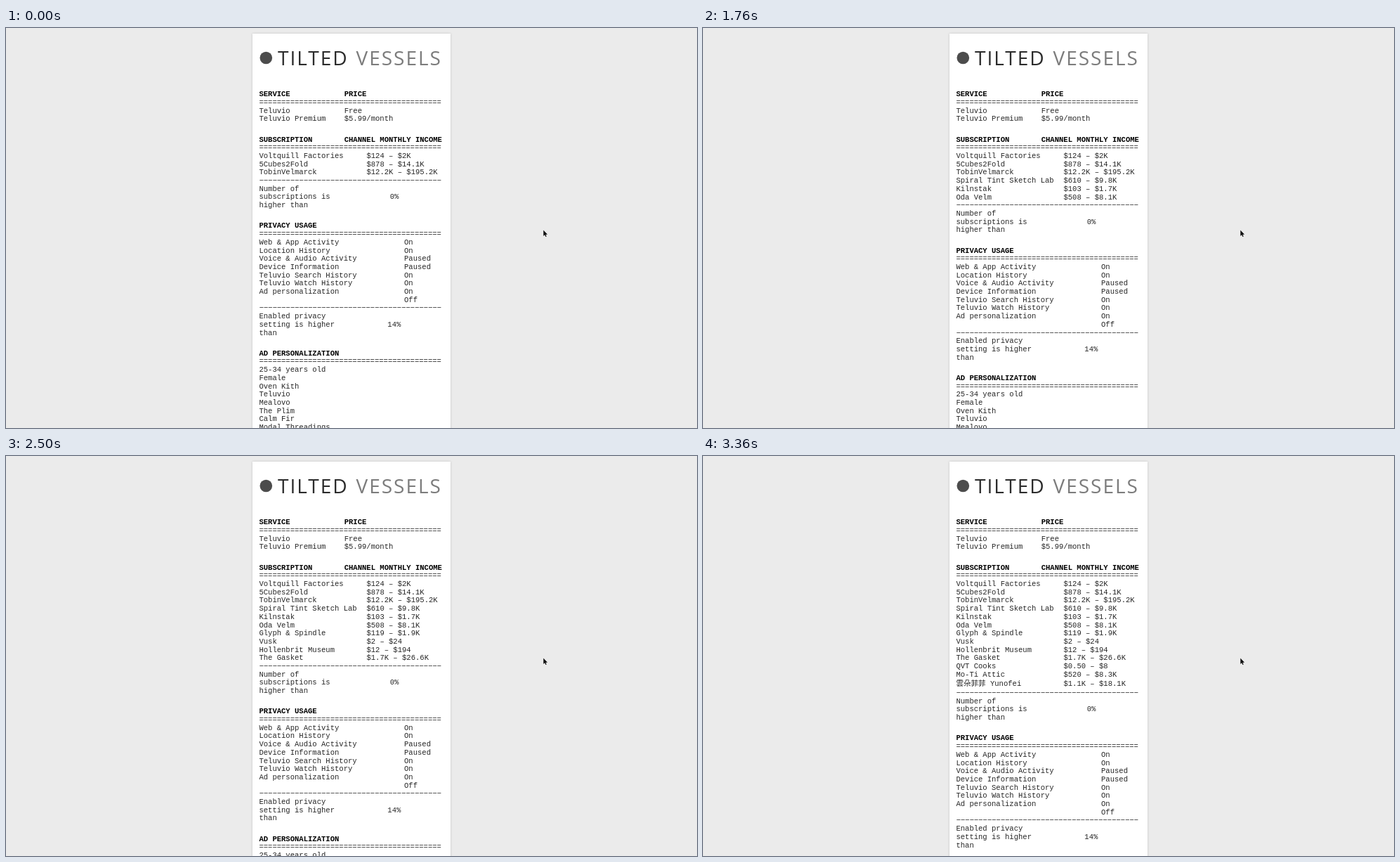
An HTML page that plays this animation: 984 px wide and 569 px high, repeating every 3580 ms.

```html
<!DOCTYPE html>
<html lang="en">
<head>
<meta charset="utf-8">
<title>Receipt</title>
<style>
  html, body { margin: 0; width: 100%; height: 100%; overflow: hidden; background: #ebebeb; }
  svg { display: block; width: 984px; height: 569px; }
  .paper { fill: #fff; filter: drop-shadow(0 0 1.5px rgba(0, 0, 0, .18)); }
  .mono { font: 10.55px "Liberation Mono", "Courier New", "Noto Sans CJK TC", "Noto Sans CJK JP", "Noto Sans CJK", monospace; fill: #262626; }
  .bold { font-weight: 700; fill: #000; }
  .brand { font: 400 28px "Open Sans", "Noto Sans", sans-serif; letter-spacing: 2px; fill: #2b2b2b; }
  .light { fill: #7c7c7c; }
</style>
</head>
<body>
<svg viewBox="0 0 984 569">
  <rect class="paper" x="351" y="8" width="282" height="600"/>
  <circle cx="370.3" cy="42.5" r="8.8" fill="#4c4c4c"/>
  <text class="brand" x="387" y="52.7">TILTED</text>
  <text class="brand light" x="498.5" y="52.7">VESSELS</text>
  <g class="mono" id="head"></g>
  <g class="mono" id="list"></g>
  <g class="mono" id="rest"></g>
  <path d="M765.3 287.6v8.4l1.9-1.7 1.2 2.7 1.4-.6-1.2-2.6h2.6z" fill="#111" stroke="#fff" stroke-width=".7" paint-order="stroke"/>
</svg>
<script>
const LOOP = 3580, LINE = 11.7, TOP = 185;
const COL = { label: 360.4, price: 481.7, income: 513.4, status: 567 };
const TALL = 3; // extra height of the CJK row

// name, income, time of appearance in ms
const channels = [
  ["Voltquill Factories", "$124 – $2K", 0],
  ["5Cubes2Fold", "$878 – $14.1K", 0],
  ["TobinVelmarck", "$12.2K – $195.2K", 0],
  ["Spiral Tint Sketch Lab", "$610 – $9.8K", 140],
  ["Kilnstak", "$103 – $1.7K", 420],
  ["Oda Velm", "$508 – $8.1K", 1340],
  ["Glyph & Spindle", "$119 – $1.9K", 2140],
  ["Vusk", "$2 – $24", 2220],
  ["Hollenbrit Museum", "$12 – $194", 2300],
  ["The Gasket", "$1.7K – $26.6K", 2500],
  ["QVT Cooks", "$0.50 – $8", 2840],
  ["Mo-Ti Attic", "$520 – $8.3K", 3120],
  ["雲朵菲菲 Yunofei", "$1.1K – $18.1K", 3360]
];
const settings = ["Web & App Activity", "Location History", "Voice & Audio Activity",
  "Device Information", "Teluvio Search History", "Teluvio Watch History", "Ad personalization"];
const states = ["On", "On", "Paused", "Paused", "On", "On", "On", "Off"];
const interests = ["25-34 years old", "Female", "Oven Kith", "Teluvio", "Mealovo",
  "The Plim", "Calm Fir", "Modal Threadings"];

const [head, list, rest] = ["head", "list", "rest"].map(id => document.getElementById(id));

function put(parent, x, row, str, bold) {
  const el = document.createElementNS("http://www.w3.org/2000/svg", "text");
  el.setAttribute("x", x);
  el.setAttribute("y", (TOP + row * LINE).toFixed(2));
  if (bold) el.setAttribute("class", "bold");
  el.textContent = str;
  parent.appendChild(el);
  return el;
}
const column = (parent, x, row, items) => items.forEach((s, i) => put(parent, x, row + i, s));
const rule = (parent, row, ch) => put(parent, COL.label, row, ch.repeat(41));
function title(parent, row, left, right) {
  put(parent, COL.label, row, left, true);
  if (right) put(parent, COL.price, row, right, true);
  rule(parent, row + 1, "=");
}

title(head, -7.5, "SERVICE", "PRICE");
column(head, COL.label, -5.5, ["Teluvio", "Teluvio Premium"]);
column(head, COL.price, -5.5, ["Free", "$5.99/month"]);
title(head, -2, "SUBSCRIPTION", "CHANNEL MONTHLY INCOME");

const rows = channels.map(([name, income], i) => {
  const row = i === channels.length - 1 ? i + TALL / 2 / LINE : i;
  return [put(list, COL.label, row, name), put(list, COL.income, row, income)];
});

rule(rest, 0, "−");
column(rest, COL.label, 1, ["Number of", "subscriptions is", "higher than"]);
put(rest, 546.7, 2, "0%");
title(rest, 5.5, "PRIVACY USAGE");
column(rest, COL.label, 7.5, settings);
column(rest, COL.status, 7.5, states);
rule(rest, 15.5, "−");
column(rest, COL.label, 16.5, ["Enabled privacy", "setting is higher", "than"]);
put(rest, 543.3, 17.5, "14%");
title(rest, 21, "AD PERSONALIZATION");
column(rest, COL.label, 23, interests);

function draw(t) {
  const n = channels.filter(c => c[2] <= t).length;
  rows.forEach((pair, i) => pair.forEach(el => el.setAttribute("visibility", i < n ? "visible" : "hidden")));
  const drop = n * LINE + (n === channels.length ? TALL : 0);
  rest.setAttribute("transform", `translate(0 ${drop.toFixed(2)})`);
}

const start = performance.now();
function tick() {
  draw((performance.now() - start) % LOOP);
  requestAnimationFrame(tick);
}
draw(0);
requestAnimationFrame(tick);
</script>
</body>
</html>
```
